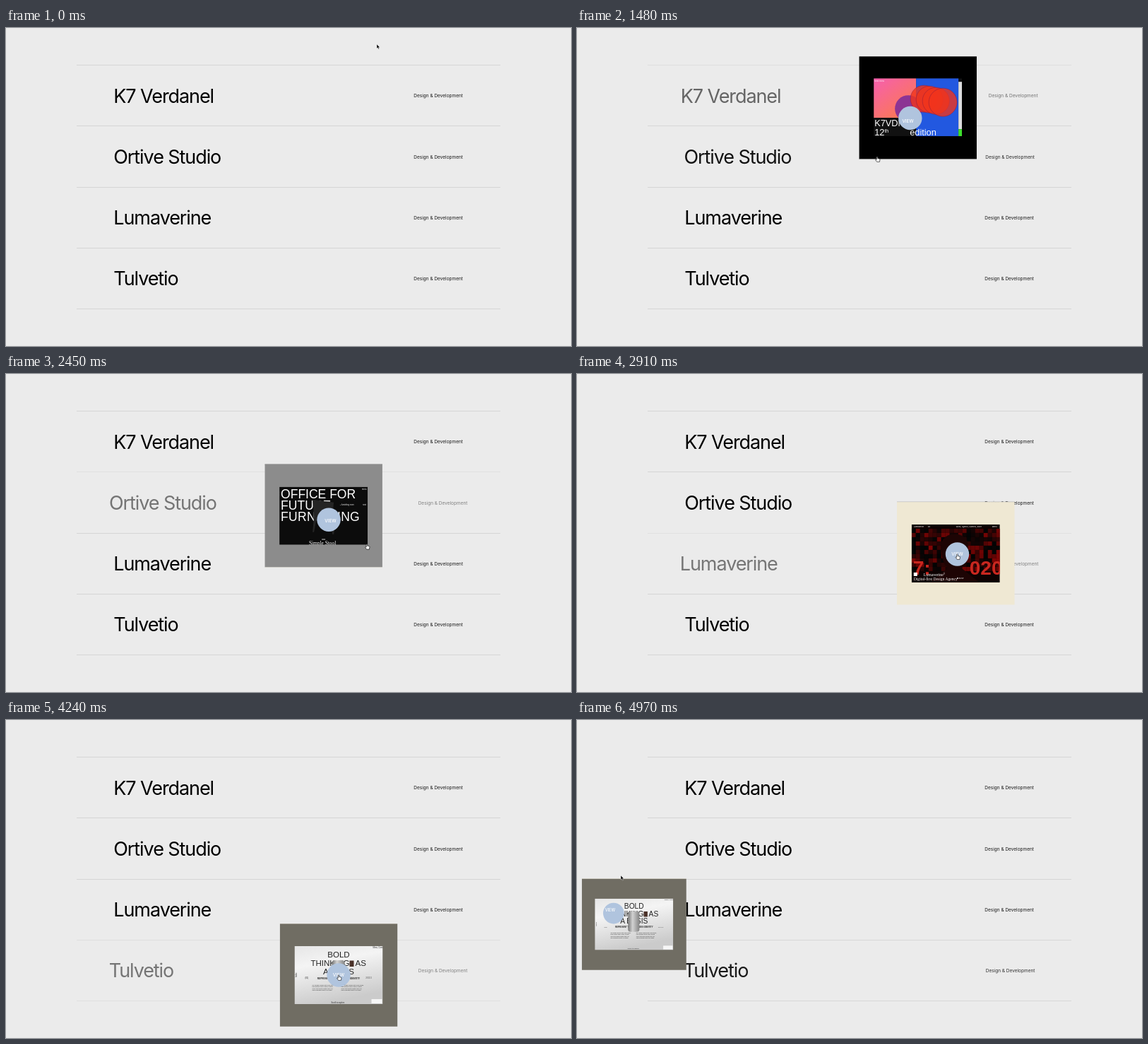
Animation of 800 by 450 pixels, one loop 5000 ms. Source, as an HTML page:

```html
<!DOCTYPE html>
<html lang="en">
<head>
<meta charset="utf-8">
<title>Project gallery</title>
<style>
  html, body { margin: 0; width: 100%; height: 100%; overflow: hidden; background: #ebebeb; }
  #stage { display: block; width: 800px; height: 450px; font-family: Inter, sans-serif; }
  .title { font-size: 27px; letter-spacing: -.04em; }
  .kind { font-size: 6.5px; text-anchor: end; fill: #1a1a1a; }
  .line { stroke: #d5d5d5; }
  .sans { font-family: "Liberation Sans", Arial, sans-serif; }
  .serif { font-family: "Liberation Serif", serif; }
  .mid { text-anchor: middle; }
  .tiny { font-size: 2.6px; }
</style>
</head>
<body>
<svg id="stage" viewBox="0 0 800 450">
  <defs>
    <linearGradient id="pink" x2=".8" y2="1"><stop stop-color="#f65fb0"/><stop offset="1" stop-color="#fb7a4c"/></linearGradient>
    <linearGradient id="paper" x2=".3" y2="1"><stop stop-color="#e6e6e6"/><stop offset=".35" stop-color="#f4f4f4"/><stop offset="1" stop-color="#cbcbcb"/></linearGradient>
    <linearGradient id="tin"><stop stop-color="#777"/><stop offset=".4" stop-color="#d2d2d2"/><stop offset="1" stop-color="#858585"/></linearGradient>
  </defs>
  <g id="rows"></g>

  <g id="modal">
    <svg x="-83.3" y="-72.8" width="166.6" height="145.6">
      <g id="slides">
        <g>
          <rect width="167" height="146"/>
          <svg x="20.8" y="31.8" width="125" height="82" class="sans">
            <rect width="125" height="82" fill="#111"/>
            <rect width="60" height="56" fill="url(#pink)"/>
            <rect x="60" width="60" height="82" fill="#2258e0"/>
            <rect x="120" y="5" width="5" height="67" fill="#ddd"/>
            <rect x="120" y="72" width="5" height="10" fill="#3ee02c"/>
            <circle cx="49" cy="43" r="19" fill="#7a2a9c" opacity=".85"/>
            <g fill="#f2341c" fill-opacity=".8" stroke="#8e1d3c" stroke-width=".5">
              <circle cx="71" cy="29" r="19"/><circle cx="79" cy="30" r="19"/>
              <circle cx="88" cy="32" r="19"/><circle cx="98" cy="34" r="20"/>
            </g>
            <rect y="56" width="60" height="26" fill="#111"/>
            <g fill="#fff" font-size="12.8">
              <text x="1" y="5" class="tiny">home menu</text>
              <text x="1" y="68">K7VDN</text>
              <text x="1" y="81">12<tspan font-size="7" dy="-4">th</tspan></text>
              <text x="51" y="81">edition</text>
            </g>
          </svg>
        </g>
        <g>
          <rect width="167" height="146" fill="#8c8c8c"/>
          <svg x="20.8" y="31.8" width="125" height="82" class="sans" fill="#fff">
            <rect width="125" height="82" fill="#0c0c0c"/>
            <g font-size="17.5">
              <text x="2" y="16.5">OFFICE FOR</text>
              <text x="2" y="32">FUTURE</text>
              <text x="2" y="48" letter-spacing=".3">FURNISHING</text>
            </g>
            <path d="M47 18L77 22L75 42L80 46L77 67H75L73 50L52 48L49 64H47L49 42Z" fill="#242424"/>
            <text x="86" y="26.5" class="tiny">▪ furnishing room</text>
            <text x="117" y="4" class="tiny">menu</text>
            <text x="118" y="26.5" class="tiny">next</text>
            <rect x="60" y="74" width="5" height=".8"/>
            <text x="61" y="82" class="serif mid" font-size="7.4">Simple Stool</text>
          </svg>
        </g>
        <g>
          <rect width="167" height="146" fill="#efe8d3"/>
          <svg x="20.8" y="31.8" width="125" height="82" fill="#fff">
            <rect width="125" height="82" fill="#0d0202"/>
            <g id="blocks"></g>
            <path d="M42 30C42 8 80 8 80 30C80 50 74 58 71 62L96 82H26L51 62C47 58 42 50 42 30Z" fill="#1d0404"/>
            <g class="sans" font-size="28" font-weight="bold" fill="#c9271f">
              <text x="2" y="71">7:</text><text x="82" y="71">020</text>
            </g>
            <g class="tiny">
              <text x="3" y="4">Lumaverine</text><text x="23" y="4">FR</text>
              <text x="63" y="4">Work, Agency, Careers, Store</text><text x="114" y="4">Menu</text>
              <text x="64" y="77">● BASE</text>
            </g>
            <rect x="3" y="68" width="5" height="5"/>
            <g class="serif">
              <text x="17" y="73" font-size="5.8">Lumaverine<tspan font-size="3" dy="-2">®</tspan></text>
              <text x="3" y="79.5" font-size="5.6">Digital-first Design Agency</text>
            </g>
          </svg>
        </g>
        <g>
          <rect width="167" height="146" fill="#706d63"/>
          <svg x="20.8" y="31.8" width="125" height="82" class="sans" fill="#222">
            <rect width="125" height="82" fill="url(#paper)"/>
            <g font-size="11.5">
              <text x="62.5" y="16.3" class="mid">BOLD</text>
              <text x="23" y="28">THINKING</text><text x="86" y="28">AS</text>
              <text x="62.5" y="40" class="mid">A BASIS</text>
            </g>
            <rect x="78" y="20.5" width="6" height="8.5" fill="#4a3128"/>
            <text x="62.5" y="47" class="mid" font-size="3.1" font-weight="bold">REPRESENT YOUR BUSINESS IDENTITY</text>
            <rect x="53" y="20" width="18" height="33" rx="4" fill="url(#tin)"/>
            <g id="copy" font-size="2.1"></g>
            <g class="tiny">
              <text x="15" y="46">(01)</text><text x="101" y="46">2 0 2 3</text>
              <text x="111" y="3">Menu, Contact</text><text x="52" y="80.5">Scroll to explore</text>
              <text transform="translate(3 44)rotate(-90)">Index</text>
            </g>
            <rect x="109" y="75" width="15" height="6" fill="#f6f6f6"/>
          </svg>
        </g>
      </g>
    </svg>
  </g>

  <circle id="disc" r="16.7" fill="#b0c4de"/>
  <text id="label" class="mid" y="2.3" font-size="6.3" font-weight="500" fill="#fff">VIEW</text>
  <path id="arrow" d="M0 0V6L1.4 4.8L2.4 7L3.4 6.6L2.5 4.4H4.3Z" stroke="#fff" stroke-width=".4"/>
  <path id="hand" d="M-.8 .4Q0 -.5 .7 .4V2.6Q1.5 2.2 1.9 2.9Q2.7 2.6 3 3.2Q3.9 3.1 4 4L3.4 7.4H-.4L-2.5 4.4Q-2.3 3.3 -.8 4.4Z"
        fill="#fff" stroke="#000" stroke-width=".6"/>
</svg>

<script>
const LOOP = 5000, SLIDE_H = 145.6, SHIFT = 6.5;
const $ = id => document.getElementById(id);
const clamp = v => Math.min(1, Math.max(0, v));

function bezier(x1, y1, x2, y2) {
  const at = (a, b, u) => 3 * a * u * (1 - u) ** 2 + 3 * b * u * u * (1 - u) + u ** 3;
  return x => {
    if (x <= 0) return 0;
    if (x >= 1) return 1;
    let lo = 0, hi = 1;
    for (let i = 0; i < 24; i++) {
      const mid = (lo + hi) / 2;
      if (at(x1, x2, mid) < x) lo = mid; else hi = mid;
    }
    return at(y1, y2, lo);
  };
}
const ease = bezier(.25, .1, .25, 1);
const swing = bezier(.76, 0, .24, 1);
const drop = bezier(.32, 0, .67, 0);

// Moments when the pointer enters each row, then leaves the list
const enter = [330, 1430, 2440, 3500, 4780];
const titles = ['K7 Verdanel', 'Ortive Studio', 'Lumaverine', 'Tulvetio'];

// Pointer path: time, x, y
const path = [
  [0, 525, 23], [270, 525, 23], [450, 522.5, 57], [1240, 522.5, 57], [1310, 512, 84],
  [1390, 466, 140], [1460, 425, 182], [2290, 425, 182], [2400, 475, 222], [2490, 538.5, 255],
  [3300, 538.5, 255], [3440, 515, 298], [3510, 471, 361], [4420, 471, 361], [4600, 240, 364],
  [4680, 12, 362], [4850, 12, 271], [4970, 62, 220], [5000, 62, 220]
];

function mouse(t) {
  const i = Math.max(1, path.findIndex(p => p[0] >= t));
  const [a, ax, ay] = path[i - 1], [b, bx, by] = path[i];
  const u = (t - a) / (b - a);
  return [ax + (bx - ax) * u, ay + (by - ay) * u];
}

// A quartic ease-out tween that restarts whenever the pointer moves
function follow(duration, t) {
  let from = mouse(0), goal = from, pos = from, start = 0;
  for (let s = 0; s <= t; s += 10) {
    const e = 1 - (1 - clamp((s - start) / duration)) ** 4;
    pos = from.map((v, k) => v + (goal[k] - v) * e);
    const m = mouse(s);
    if (m[0] !== goal[0] || m[1] !== goal[1]) {
      from = pos;
      goal = m;
      start = s;
    }
  }
  return pos;
}

const lineAt = i => {
  const y = Math.round(52 + 86.3 * i) + .5;
  return `<path class="line" d="M100 ${y}H700"/>`;
};
$('rows').innerHTML = titles.map((title, i) => `<g>${lineAt(i)}${i === 3 ? lineAt(4) : ''}
  <text class="title" x="152.3" y="${105.6 + 86.25 * i}">${title}</text>
  <text class="kind" x="647" y="${98.4 + 86.25 * i}">Design &amp; Development</text></g>`).join('');

let seed = 7;
const random = () => (seed = seed * 16807 % 2147483647) / 2147483647;
let blocks = '';
for (let y = 6; y < 66; y += 6)
  for (let x = 0; x < 125; x += 6)
    blocks += `<rect x="${x}" y="${y}" width="6" height="6" fill="rgb(${Math.round(130 * random() ** 2)},4,4)"/>`;
$('blocks').innerHTML = blocks;

const copy = ['We design brands with clear ideas,', 'bold shapes and a calm, honest', 'voice that helps people find you', 'and remember what you make.'];
$('copy').innerHTML = [25, 66].map(x => copy.map((line, i) =>
  `<text x="${x}" y="${56 + 2.3 * i}">${line}</text>`).join('')).join('');

const rows = [...$('rows').children];
const place = (id, [x, y], scale = 1) =>
  $(id).setAttribute('transform', `translate(${x} ${y}) scale(${scale})`);

function draw(t) {
  rows.forEach((row, i) => {
    const h = ease((t - enter[i]) / 400) - ease((t - enter[i + 1]) / 400);
    const [title, kind] = row.querySelectorAll('text');
    row.setAttribute('opacity', 1 - h / 2);
    title.setAttribute('transform', `translate(${-SHIFT * h})`);
    kind.setAttribute('transform', `translate(${SHIFT * h})`);
  });

  const offset = enter.slice(1, 4).reduce((sum, at) => sum + swing((t - at) / 500), 0);
  $('slides').setAttribute('transform', `translate(0 ${-SLIDE_H * offset})`);

  const scale = swing((t - enter[0]) / 400) - drop((t - enter[4]) / 400);
  place('modal', follow(720, t), scale);
  place('disc', follow(500, t), scale);
  place('label', follow(450, t), scale);

  const inside = t >= enter[0] && t < enter[4];
  place('arrow', mouse(t), inside ? 0 : 1);
  place('hand', mouse(t), inside ? 1 : 0);
}

[...$('slides').children].forEach((slide, i) =>
  slide.setAttribute('transform', `translate(0 ${SLIDE_H * i})`));

function frame() {
  draw(performance.now() % LOOP);
  requestAnimationFrame(frame);
}
frame();
</script>
</body>
</html>
```
